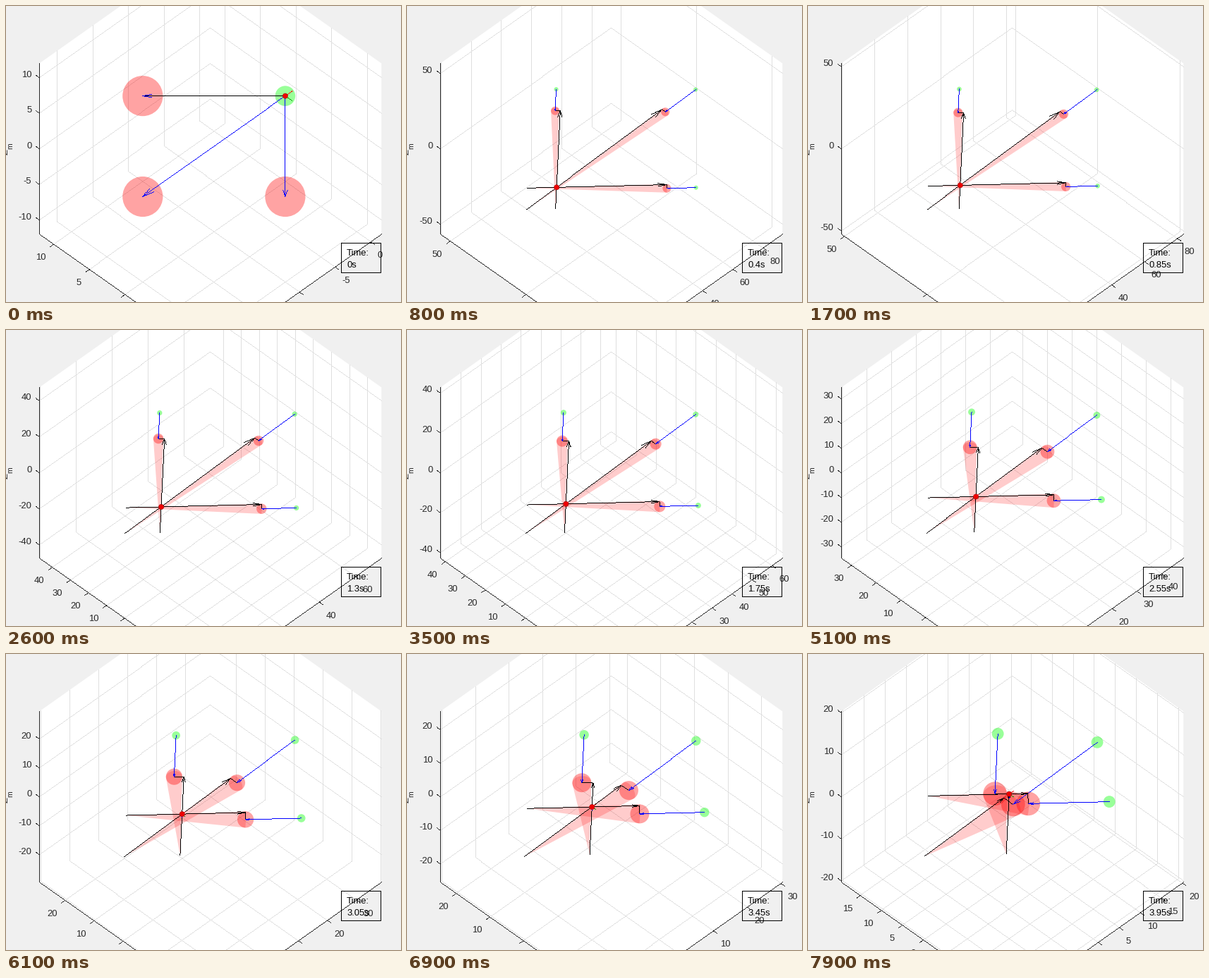
Write a matplotlib script that moves like this. It is 560 px wide and 420 px high and loops after 8 s.

```python
import numpy as np
import matplotlib.pyplot as plt
from matplotlib.animation import FuncAnimation
from matplotlib.patches import Circle, Polygon

W, H, DPI = 560, 420, 100
FRAMES, INTERVAL, DT = 80, 100, 0.05
CX, CY, HALF = 289.8, 202.65, 121.25   # screen centre, half height of the box
TILT = np.sqrt(0.5)                    # sine of the 45 degree elevation
PX = 72 / DPI
INK = "#262626"

plt.rcParams["font.family"] = "Liberation Sans"
plt.rcParams["font.size"] = 13 * PX

fig = plt.figure(figsize=(W / DPI, H / DPI), dpi=DPI, facecolor="#f0f0f0")
ax = fig.add_axes([0, 0, 1, 1])

# Relative start positions and velocities of the three obstacles
START = np.array([[50, 50, 0], [100, 0, 0], [50, -50, 0]], float)
VEL = np.array([[-10.43, -9.75, 0], [-20.46, -0.45, 0], [-9.97, 9.31, 0]])
VEL_INIT = np.array([[-10, -10, 0], [-20, 0, 0], [-10, 10, 0]], float)


class View:
    """Orthographic view of a cube, azimuth -45, elevation 45."""

    def __init__(self, xc, yc, half):
        self.mid = np.array([xc, yc, 0.0])
        self.lo, self.hi = self.mid - half, self.mid + half
        self.k = HALF / half

    def __call__(self, pts):
        x, y, z = (np.asarray(pts, float) - self.mid).T
        return np.stack([CX + self.k * (x - y),
                         CY - self.k * (TILT * (x + y) + z)], axis=-1)


def line(pts, color, z=5):
    """Polyline one pixel wide with hard steps."""
    pts = np.asarray(pts, float)
    runs = []
    for a, b in zip(pts[:-1], pts[1:]):
        n = int(np.abs(b - a).max()) + 2
        runs.append(np.floor(np.linspace(a, b, n)))
    # a pixel marker sits to the upper right of its point
    xy = np.unique(np.vstack(runs), axis=0) + [0, 1]
    ax.plot(xy[:, 0], xy[:, 1], ",", color=color, zorder=z)


def ticks(lo, hi, most):
    """Widest cover of the range wins, then the finest step."""
    best, found = (-1, 0), np.array([])
    for step in (1, 2, 5, 10, 20, 50, 100):
        t = np.arange(np.ceil(lo / step), np.floor(hi / step) + 1) * step
        if 0 < len(t) <= most:
            score = (t[-1] - t[0], -step)
            if score > best:
                best, found = score, t
    return found


def tick(p, dx, dy, label, tx, ty, ha):
    line([p, p + [dx, dy]], INK, 2)
    q = p + [tx, ty]
    if q[1] < H + 12:
        ax.text(q[0], q[1], f"{label:.0f}", color=INK, ha=ha,
                va="center_baseline", zorder=2)


def draw_box(view):
    (x0, y0, z0), (x1, y1, z1) = view.lo, view.hi
    hexagon = view([(x0, y1, z0), (x0, y0, z0), (x1, y0, z0),
                    (x1, y0, z1), (x1, y1, z1), (x0, y1, z1)])
    ax.add_patch(Polygon(hexagon, fc="white", ec="none", zorder=0))
    grid = "#dfdfdf"
    for x in ticks(x0, x1, 9):
        line(view([(x, y0, z0), (x, y1, z0), (x, y1, z1)]), grid, 1)
        tick(view((x, y0, z0)), 5, 3.5, x, 9.5, 18, "left")
    for y in ticks(y0, y1, 9):
        line(view([(x0, y, z0), (x1, y, z0), (x1, y, z1)]), grid, 1)
        tick(view((x0, y, z0)), -5, 3.5, y, -11, 17.5, "right")
    for z in ticks(z0, z1, 8):
        line(view([(x0, y1, z), (x1, y1, z), (x1, y0, z)]), grid, 1)
        tick(view((x0, y1, z)), -5, -3.5, z, -11, -5.5, "right")
    line(view([(x0, y1, z1), (x0, y1, z0), (x0, y0, z0), (x1, y0, z0)]),
         INK, 2)
    side = dict(rotation=90, rotation_mode="anchor", ha="left",
                va="baseline", color=INK)
    ax.text(2.5, 211, "Z", **side)
    ax.text(9, 203, "m", fontsize=10.4 * PX, **side)


def arrow(view, tail, vec, color, head=None):
    tip = tail + vec
    line(view([tail, tip]), color)
    back = 0.062 * vec
    side = 0.25 * np.array([-back[1], back[0], 0])
    line(view([tip - back + side, tip, tip - back - side]), head or color, 6)


def ball(view, pos, r, color, alpha):
    ax.add_patch(Circle(view(pos), r * view.k * np.sqrt(2), fc=color,
                        ec="none", alpha=alpha, zorder=4))


def cone(view, apex, axis, r):
    d = axis / np.linalg.norm(axis)
    turn = -1 if d[0] + d[1] > 0 else 1
    side = turn * np.array([-d[1], d[0], 0])
    a = np.linspace(0, 2 * np.pi, 48, endpoint=False)[:, None]
    rim = view(apex + axis + r * (np.cos(a) * side
                                  + np.sin(a) * np.array([0, 0, 1])))
    tip = view(apex)
    mid = view(apex + axis) - tip
    rel = rim - tip
    bend = np.arctan2(mid[0] * rel[:, 1] - mid[1] * rel[:, 0], rel @ mid)
    first, last = np.argmax(bend), np.argmin(bend)
    arc = np.roll(rim, -first, axis=0)[:(last - first) % len(rim) + 1]
    ax.add_patch(Polygon(np.vstack([tip, arc]), fc="red", ec="none",
                         alpha=0.2, zorder=3))


def draw_agent(view):
    o = np.zeros(3)
    for end, color in (((1, 0, 0), "red"), ((0, -1, 0), "#00a000"),
                       ((0, 0, -1), "blue")):
        line(view([o, end]), color, 7)
    ax.add_patch(Circle(view(o), 3.6, fc="#f00000", ec="#900000",
                        lw=0.5 * PX, zorder=8))


def draw_start():
    view = View(-10.5, 0, 12)
    draw_box(view)
    o = np.zeros(3)
    ball(view, o, 1, "lime", 0.4)
    for v in VEL_INIT:
        ball(view, v, 2, "red", 0.36)
        arrow(view, o, v, "black" if v[1] > 0 else "blue", "blue")
    draw_agent(view)


def draw_motion(t):
    view = View(40.28 - 10.22 * t, -0.22 * t, 60.72 - 10.22 * t)
    draw_box(view)
    for p, v in zip(START + VEL * t, VEL):
        cone(view, v, p, 2)
        ball(view, p + v, 2, "red", 0.36)
        ball(view, p, 1, "lime", 0.4)
        arrow(view, p, v, "blue")
        # part of the offset along the relative velocity, then the miss
        d = -v / np.linalg.norm(v)
        along = (p @ d) * d
        arrow(view, v, along, "black")
        line(view([v + along, v + p]), "black")
    draw_agent(view)


def draw_clock(t):
    x0, y0, x1, y1 = 475, 336, 531, 378
    line([(x0, y0), (x1, y0), (x1, y1), (x0, y1), (x0, y0)], "black", 9)
    ax.text(483, 354, "Time:", va="baseline", zorder=9)
    ax.text(483, 371, f"{t:.4g}s", va="baseline", zorder=9)


def update(i):
    ax.clear()
    ax.set_xlim(0, W)
    ax.set_ylim(H, 0)
    ax.axis("off")
    t = i * DT
    if i == 0:
        draw_start()
    else:
        draw_motion(t)
    draw_clock(t)
    return []


anim = FuncAnimation(fig, update, frames=FRAMES, interval=INTERVAL,
                     init_func=lambda: [], repeat=True, repeat_delay=0)
plt.show()
```
